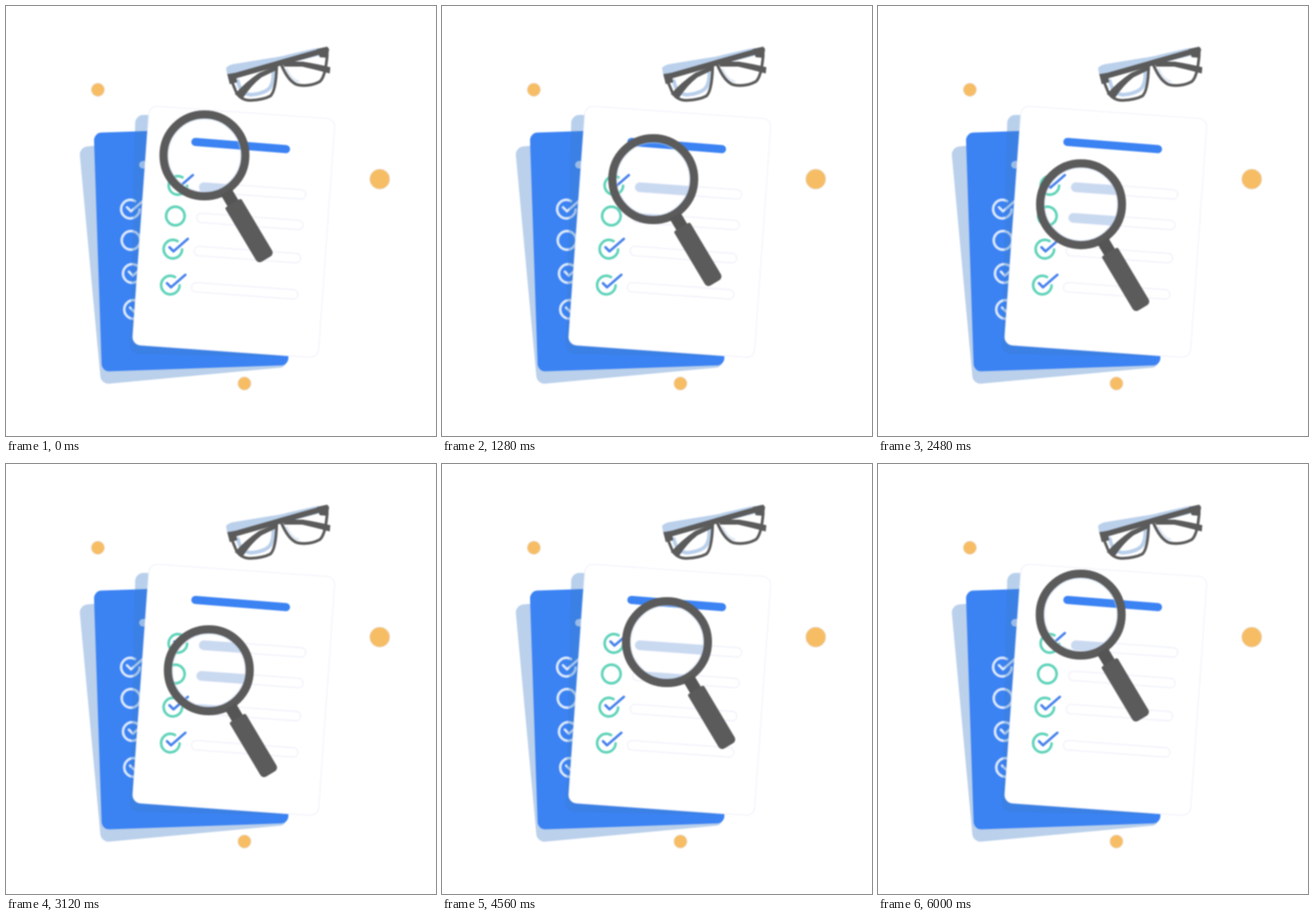
Animation of 688 by 688 pixels, one loop 6080 ms. Source, as an HTML page with a canvas:

```html
<!DOCTYPE html>
<html lang="en">
<head>
<meta charset="utf-8">
<title>Checklist under a magnifying glass</title>
<style>
html, body { margin: 0; width: 100%; height: 100%; overflow: hidden; background: #fff; }
canvas { display: block; width: 688px; height: 688px; filter: blur(.8px); }
</style>
</head>
<body>
<canvas id="stage" width="688" height="688"></canvas>
<script>
const ctx = document.getElementById('stage').getContext('2d');
const LOOP = 6080, STEP = 80;
const BLUE = '#3b82f3', PALE = '#bad0eb', GREY = '#5b5b5b', GREEN = '#5fd3b9', TICK = '#4681ec', ORANGE = '#f7bd64';
const RAD = Math.PI / 180;

// Lens centre: time, x, y
const PATH = [
  [0, 317.5, 239], [720, 346, 257], [1280, 338, 277], [1840, 331, 294],
  [3120, 324.5, 330], [4560, 360, 285], [5440, 348, 254], [6000, 324.3, 241], [6080, 319, 239.5]
];

// Left ends of the four list rows, with the check ring beside each
const ROWS = [
  { bar: [317, 290], ring: [275, 287], done: true },
  { bar: [313, 339], ring: [271, 336], done: false },
  { bar: [309, 392], ring: [267, 389], done: true },
  { bar: [304.5, 450], ring: [263, 446.5], done: true }
];
const BACK_ROWS = [[199, 325, true], [200, 375, false], [202, 428, true], [204, 485.5, true]];

function sheet(x, y, w, h, angle, radius, fill, edge) {
  ctx.save();
  ctx.translate(x, y);
  ctx.rotate(angle * RAD);
  ctx.beginPath();
  ctx.roundRect(0, 0, w, h, radius);
  ctx.fillStyle = fill;
  ctx.fill();
  if (edge) {
    ctx.strokeStyle = edge;
    ctx.lineWidth = 1.5;
    ctx.stroke();
  }
  ctx.restore();
}

function line(points, color, width) {
  ctx.beginPath();
  points.forEach(([x, y], i) => i ? ctx.lineTo(x, y) : ctx.moveTo(x, y));
  ctx.strokeStyle = color;
  ctx.lineWidth = width;
  ctx.lineCap = ctx.lineJoin = 'round';
  ctx.stroke();
}

function curve(d, color, width) {
  ctx.strokeStyle = color;
  ctx.lineWidth = width;
  ctx.lineCap = ctx.lineJoin = 'round';
  ctx.stroke(new Path2D(d));
}

function shape(d, color) {
  ctx.fillStyle = color;
  ctx.fill(new Path2D(d));
}

function dot(x, y, r) {
  ctx.beginPath();
  ctx.arc(x, y, r, 0, 7);
  ctx.fillStyle = ORANGE;
  ctx.fill();
  ctx.strokeStyle = '#e6d8cc';
  ctx.lineWidth = 1;
  ctx.stroke();
}

function check(x, y, done, ringColor, tickColor) {
  ctx.beginPath();
  ctx.arc(x, y, 14.8, done ? 2 * RAD : 0, (done ? 300 : 360) * RAD);
  ctx.strokeStyle = ringColor;
  ctx.lineWidth = 4.2;
  ctx.lineCap = 'round';
  ctx.stroke();
  if (done) line([[x - 5.5, y - 3], [x + 1, y + 3.5], [x + 24, y - 16.5]], tickColor, 4);
}

function bar([x, y], fill) {
  ctx.save();
  ctx.translate(x, y);
  ctx.rotate(4.2 * RAD);
  ctx.beginPath();
  ctx.roundRect(-8, -7.5, 171, 15, 7.5);
  if (fill) {
    ctx.fillStyle = fill;
    ctx.fill();
  } else {
    ctx.strokeStyle = '#eeeffa';
    ctx.lineWidth = 1.6;
    ctx.stroke();
  }
  ctx.restore();
}

function glasses() {
  shape('M352 99 Q357 94 364 93 L425 83 Q440 81 450 78 L494 68 L512 66 L514 76 L440 95 L362 117 L354 110 Z', PALE);
  curve('M371 120 Q375 141 392 142 Q414 140 422 131 Q428 124 428 104', PALE, 6);
  curve('M449 101 Q455 117 468 121', '#dce7f5', 3);
  line([[360, 113.5], [432, 93], [442, 90], [511, 70.5]], GREY, 9);
  shape('M354 109 L367 107 L370 122 L358 125 Z M497 69 L514 65 L517 69 L515 83 L502 82 Z', GREY);
  curve('M361 120 L368 137 Q375 151 391 151 Q412 150 423 144 Q432 136 433 97', GREY, 4.5);
  curve('M441 95 Q452 121 466 126 Q485 130 502 121 Q511 114 514 78', GREY, 4.5);
  shape('M366 141 Q384 121 405 107 L432 96 L434 102 L409 114 Q392 127 378 149 Z', GREY);
  shape('M442 89 L475 89 Q500 93 519 98 L518 108 Q496 102 474 97 L445 97 Z', GREY);
}

function papers() {
  sheet(117, 226, 300, 381, -5.3, 13, PALE);
  sheet(140.5, 203, 299, 382, -1.93, 12, BLUE);
  line([[219, 254], [260, 252]], '#cfdffa', 12);
  for (const [x, y, done] of BACK_ROWS) check(x, y, done, '#dce8fc', '#dce8fc');
  sheet(207, 174, 250, 382, 1.3, 13, 'rgba(60,125,200,.36)');
  sheet(229.5, 159.5, 298, 383, 4.1, 13, '#fff', '#f0f1fb');
  line([[303, 217.5], [448, 229]], BLUE, 13);
  for (const row of ROWS) {
    bar(row.bar);
    check(...row.ring, row.done, GREEN, TICK);
  }
}

function magnifier(x, y) {
  ctx.save();
  ctx.beginPath();
  ctx.arc(x, y, 61, 0, 7);
  ctx.clip();
  for (const row of ROWS) bar(row.bar, '#c9d9f0');
  ctx.restore();

  ctx.save();
  ctx.translate(x, y);
  ctx.beginPath();
  ctx.arc(0, 0, 58.5, 0, 7);
  ctx.strokeStyle = 'rgba(190,210,240,.45)';
  ctx.lineWidth = 3;
  ctx.stroke();
  ctx.beginPath();
  ctx.arc(0, 0, 65.5, 0, 7);
  ctx.strokeStyle = GREY;
  ctx.lineWidth = 13;
  ctx.stroke();
  ctx.rotate(59.2 * RAD);
  ctx.fillStyle = '#555';
  ctx.fillRect(68, -10, 25, 20);
  ctx.fillStyle = GREY;
  ctx.beginPath();
  ctx.roundRect(89, -15, 104, 30, [3, 7, 7, 3]);
  ctx.fill();
  ctx.restore();
}

// Smooth curve through PATH, with slopes taken from the neighbours
function lensAt(t) {
  let i = 0;
  while (i < PATH.length - 2 && t >= PATH[i + 1][0]) i++;
  const a = PATH[i], b = PATH[i + 1], span = b[0] - a[0], u = (t - a[0]) / span;
  const slope = (k, axis) => {
    const p = PATH[Math.max(k - 1, 0)], n = PATH[Math.min(k + 1, PATH.length - 1)];
    return (n[axis] - p[axis]) / (n[0] - p[0]);
  };
  return [1, 2].map(axis => {
    const v = 1 - u;
    return a[axis] * (1 + 2 * u) * v * v + b[axis] * u * u * (3 - 2 * u)
      + span * (slope(i, axis) * u * v * v - slope(i + 1, axis) * u * u * v);
  });
}

function draw(t) {
  ctx.fillStyle = '#fff';
  ctx.fillRect(0, 0, 688, 688);
  dot(147, 134, 10.5);
  dot(598, 277, 16);
  dot(381.5, 604, 10.5);
  glasses();
  papers();
  magnifier(...lensAt(t));
}

const start = performance.now();
function tick() {
  const t = (performance.now() - start) % LOOP;
  draw(Math.floor(t / STEP) * STEP);
  requestAnimationFrame(tick);
}
tick();
</script>
</body>
</html>
```
